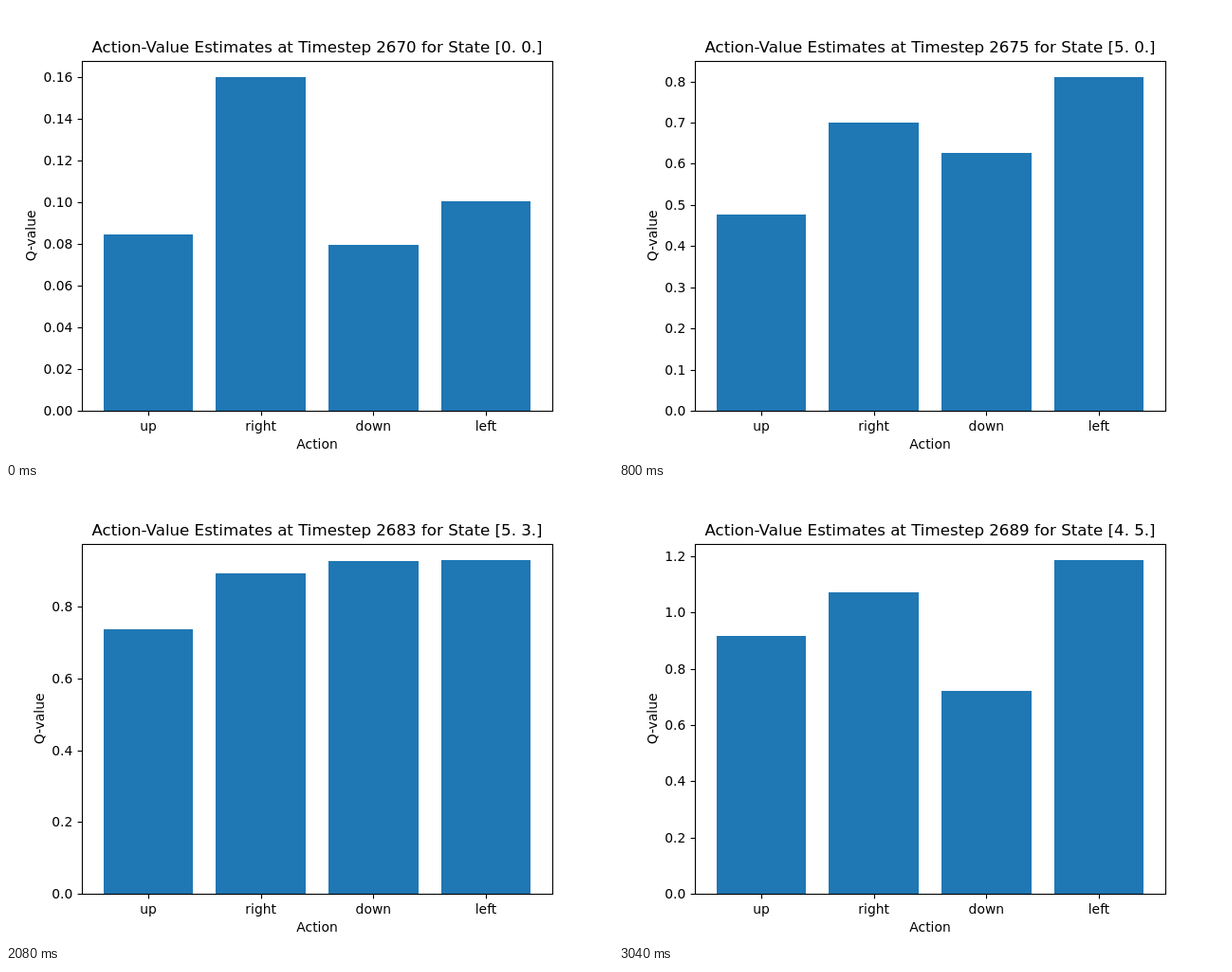
Write an HTML page with a canvas that moves like this. It is 640 px wide and 480 px high and loops after 3.2 s.

```html
<!DOCTYPE html>
<html lang="en">
<head>
<meta charset="utf-8">
<title>Action-Value Estimates</title>
<style>
  html, body { margin: 0; height: 100%; overflow: hidden; background: #fff; }
  canvas { display: block; }
</style>
</head>
<body>
<canvas id="chart" width="640" height="480"></canvas>
<script>
const ctx = document.getElementById('chart').getContext('2d');
const STEP_MS = 160, FIRST_STEP = 2670;
const LEFT = 80, RIGHT = 576, TOP = 57.6, BOTTOM = 427.2;
const UNIT = (RIGHT - LEFT) / 4.18;
const ACTIONS = ['up', 'right', 'down', 'left'];

// state, then the value of each action
const STEPS = [
  ['00', .0846, .16, .0797, .1005],
  ['10', .123, .25, .142, .182],
  ['20', .178, .3887, .2531, .3282],
  ['30', .27, .52, .37, .46],
  ['40', .37, .655, .5, .62],
  ['50', .4768, .7, .6264, .81],
  ['50', .4768, .7, .6264, .825],
  ['50', .4768, .7, .6264, .866],
  ['51', .6392, .8853, .6752, 1.01],
  ['52', .69, .89, .8, 1.04],
  ['51', .6392, .8853, .6752, .9732],
  ['52', .69, .89, .8, .97],
  ['53', .7367, .8924, .9267, .943],
  ['53', .7367, .8924, .9267, .9288],
  ['54', .85, .95, .9, 1.415],
  ['44', .9, 1, .8, 1.2],
  ['45', .9353, 1.0739, .7434, 1.2508],
  ['45', .93, 1.073, .737, 1.268],
  ['45', .923, 1.072, .73, 1.222],
  ['45', .917, 1.072, .7217, 1.1859]
];

function text(str, x, y, align = 'center', size = 13.889) {
  ctx.font = `${size}px "DejaVu Sans", sans-serif`;
  ctx.textAlign = align;
  ctx.fillText(str, x, y);
}

function line(x1, y1, x2, y2) {
  ctx.beginPath();
  ctx.moveTo(x1, y1);
  ctx.lineTo(x2, y2);
  ctx.stroke();
}

// Smallest round interval that divides the axis into nine parts at most
const tickInterval = limit => [.02, .025, .05, .1, .2, .25].find(s => limit / s <= 9);

function draw(index) {
  const [state, ...values] = STEPS[index];
  const limit = Math.max(...values) * 1.05;
  const interval = tickInterval(limit);
  const decimals = interval < .1 ? 2 : 1;
  const toY = v => Math.round(BOTTOM - v / limit * (BOTTOM - TOP));
  const toX = v => LEFT + (v + .59) * UNIT;

  ctx.fillStyle = '#fff';
  ctx.fillRect(0, 0, 640, 480);

  ctx.fillStyle = '#1f77b4';
  values.forEach((v, i) => {
    const x = Math.round(toX(i - .4)), y = toY(v);
    ctx.fillRect(x, y, Math.round(toX(i + .4)) - x, 427 - y);
  });

  ctx.fillStyle = ctx.strokeStyle = '#000';
  ctx.lineWidth = 1.11;
  ctx.strokeRect(LEFT + .5, 58.5, RIGHT - LEFT, 369);

  ACTIONS.forEach((name, i) => {
    const x = Math.round(toX(i));
    line(x + .5, 427.5, x + .5, 432.4);
    text(name, toX(i), 448);
  });
  for (let i = 0; i * interval <= limit; i++) {
    const y = toY(i * interval);
    line(75.6, y + .5, 80.5, y + .5);
    text((i * interval).toFixed(decimals), 70.3, y + 5, 'right');
  }

  text('Action', 328, 467);
  text(`Action-Value Estimates at Timestep ${FIRST_STEP + index} for State [${state[0]}. ${state[1]}.]`,
    328, 49, 'center', 16.667);

  ctx.save();
  ctx.translate(decimals === 2 ? 31 : 40, 242.4);
  ctx.rotate(-Math.PI / 2);
  text('Q-value', 0, 0);
  ctx.restore();
}

function frame() {
  draw(Math.floor(performance.now() / STEP_MS) % STEPS.length);
  requestAnimationFrame(frame);
}
frame();
</script>
</body>
</html>
```
